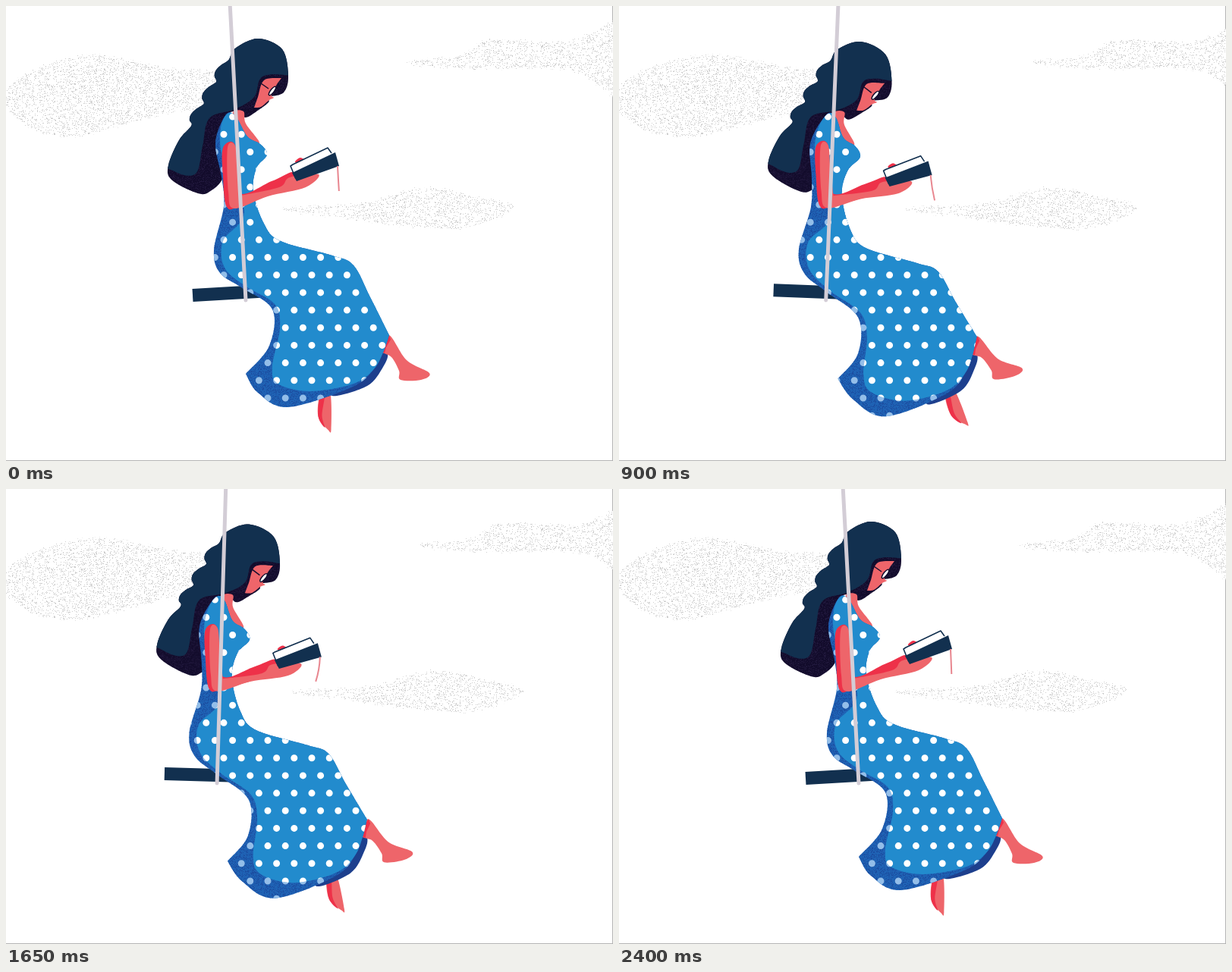
Recreate the animation shown at these times as an HTML page with a canvas. Size 800x600 px, loop 2.43 s.

```html
<!DOCTYPE html>
<html lang="en">
<head>
<meta charset="utf-8">
<title>Reading on a swing</title>
<style>
html, body { margin: 0; width: 100%; height: 100%; overflow: hidden; background: #fff; }
canvas { display: block; }
</style>
</head>
<body>
<canvas id="stage" width="800" height="600"></canvas>
<script>
const ctx = document.getElementById('stage').getContext('2d');
const LOOP = 2430, STEP = 30, HALF = LOOP / 2;
const NAVY = '#12304f', INK = '#130c2c', SKIN = '#ee656a', RED = '#ee3149';
const BLUE = '#228bcd', SHADE = '#1f62b4', DEEP = '#1d3f8d';

let seed = 7;
function random() {
  seed = (seed * 1664525 + 1013904223) % 4294967296;
  return seed / 4294967296;
}

function grain(color, density) {
  const tile = document.createElement('canvas');
  tile.width = tile.height = 256;
  const g = tile.getContext('2d');
  g.fillStyle = color;
  for (let y = 0; y < 256; y++)
    for (let x = 0; x < 256; x++)
      if (random() < density) g.fillRect(x, y, 1, 1);
  return ctx.createPattern(tile, 'repeat');
}
const cloudGrain = grain('#cecece', 0.13);
const edgeGrain = grain('#cecece', 0.05);
const dressGrain = grain('rgba(24,62,146,.55)', 0.3);
const hairGrain = grain('rgba(42,32,72,.6)', 0.25);

const mix = (a, b, p) => a + (b - a) * p;
const points = s => s.split(',').map(pair => pair.trim().split(' ').map(Number));

// Smooth closed curve through key points; a doubled point makes a corner.
function curve(keys, move = q => q) {
  const path = new Path2D(), n = keys.length, moved = keys.map(move);
  const at = i => moved[(i + n) % n];
  path.moveTo(...at(0));
  for (let i = 0; i < n; i++) {
    const [a, b, c, d] = [at(i - 1), at(i), at(i + 1), at(i + 2)];
    if (b[0] === c[0] && b[1] === c[1]) continue;
    path.bezierCurveTo(b[0] + (c[0] - a[0]) / 6, b[1] + (c[1] - a[1]) / 6,
                       c[0] - (d[0] - b[0]) / 6, c[1] - (d[1] - b[1]) / 6, ...c);
  }
  path.closePath();
  return path;
}

function polygon(keys, move = q => q) {
  const path = new Path2D();
  keys.map(move).forEach(q => path.lineTo(...q));
  path.closePath();
  return path;
}

function fill(path, ...styles) {
  for (const style of styles) {
    ctx.fillStyle = style;
    ctx.fill(path);
  }
}

function line(keys, color, width, cap = 'butt') {
  ctx.strokeStyle = color;
  ctx.lineWidth = width;
  ctx.lineCap = cap;
  ctx.lineJoin = 'round';
  ctx.beginPath();
  keys.forEach(q => ctx.lineTo(...q));
  ctx.stroke();
}

function group(draw) {
  ctx.save();
  draw();
  ctx.restore();
}

// Scalloped back edge of the hair, from the nape up to the crown.
const waves = Array.from({ length: 13 }, (_, i) => {
  const y = 158 - i * 7.25;
  return [302 - 0.567 * (y - 56) - 9 * Math.abs(Math.sin(Math.PI * (y - 71) / 29)), y];
});

// All key points describe the right end of the swing.
const clouds = {
  west: points('0 115, 50 79, 120 66, 210 83, 290 90, 290 124, 200 143, 90 171, 25 155'),
  low: points('365 268, 470 261, 550 240, 615 252, 667 266, 610 291, 540 291, 450 279'),
  east: points('528 75, 600 66, 640 45, 740 48, 820 20, 820 125, 745 84, 620 82')
};
const hair = [
  ...points('332 43, 364 57, 372 92, 366 114, 347 120, 346 127, 333 137, 316 147, 305 139, 290 150, 288 220, 268 245, 250 246, 218 229, 214 210, 228 177'),
  ...waves, [302, 56]
];
const hairLight = points('332 30, 390 60, 390 90, 352 90, 335 96, 327 120, 302 136, 268 148, 259 185, 250 221, 222 218, 195 190, 240 90');
const face = points('340 98, 363 95, 363 95, 356 105, 350 118, 353 121, 347 124, 336 133, 327 134, 327 134, 332 120');
const neck = points('299 140, 313 139, 316 155, 334 180, 318 178, 305 160');
const dress = points(`303 146, 318 172, 335 182, 344 196, 330 214, 326 245, 340 287, 362 310, 430 329, 458 342,
  480 384, 505 434, 505 434, 497 457, 484 480, 455 503, 372 529, 332 510, 316 485, 316 485, 347 448,
  351 400, 310 371, 282 352, 274 322, 287 264, 284 225, 276 180, 290 143`);
const dressLight = points(`296 140, 360 170, 360 250, 520 380, 510 440, 484 480, 455 499, 400 508, 358 498,
  351 475, 361 425, 354 393, 315 369, 288 345, 286 310, 314 270, 283 190`);
const hemShadow = points('490 440, 503 457, 497 476, 476 501, 430 514, 440 490');
const frontLeg = points('505 434, 528 467, 558 484, 547 493, 520 493, 518 481, 508 463, 494 454');
const frontLegShade = points('505 434, 507 440, 501 450, 499 458, 490 452');
const backLeg = points('414 512, 427 510, 428 558, 424 559, 411 541');
const backLegShade = points('414 512, 420 512, 416 540, 420 556, 411 541');
const armShade = points('286 187, 302 184, 307 246, 350 231, 378 219, 372 238, 310 263, 291 265, 286 225');
const arm = points('292 187, 302 184, 305 215, 309 250, 309 250, 360 239, 374 226, 412 222, 395 239, 345 251, 301 267, 293 245');
const thumb = points('381 206, 388 200, 396 206');
const pages = points('375 211, 424 187, 432 195, 380 221');
const bookEdge = points('382 228, 375 211, 378 209, 424 187, 429 194');
const cover = points('377 220, 434 193, 439 211, 383 231');

// Cubic ease (.6, 0, .4, 1), solved by bisection.
function ease(x) {
  let lo = 0, hi = 1;
  for (let i = 0; i < 24; i++) {
    const u = (lo + hi) / 2, v = 1 - u;
    if (1.8 * u * v * v + 1.2 * u * u * v + u * u * u < x) lo = u; else hi = u;
  }
  return lo * lo * (3 - 2 * lo);
}

// 0 at the right end of the swing, 1 at the left end.
function swing(time) {
  const t = time % LOOP;
  return ease((t < HALF ? t : LOOP - t) / HALF);
}

// The cloth moves left, most at the hips, and its middle sinks.
const sag = p => ([x, y]) => [
  x + p * (20 * ((y - 345) / 190) ** 2 - 41),
  y + p * 14 * Math.sin(Math.PI * (x - 275) / 240) * Math.min(1, y / 350) ** 2
];

function cloud(keys, dx, stretch = 0) {
  const path = curve(keys, ([x, y]) => [x + dx + stretch * x, y]);
  fill(path, '#fff', cloudGrain);
  ctx.strokeStyle = edgeGrain;
  ctx.lineWidth = 5;
  ctx.stroke(path);
}

// The dots stay in place while the dress moves over them.
function polkaDots(color) {
  ctx.fillStyle = color;
  ctx.beginPath();
  for (let row = 0; row < 18; row++)
    for (let col = 8; col < 24; col++) {
      const x = 8.6 + (col + (row % 2 ? 0 : 0.5)) * 23.2, y = 146.1 + row * 23.18;
      ctx.moveTo(x + 4.5, y);
      ctx.arc(x, y, 4.5, 0, 7);
    }
  ctx.fill();
}

function drawSwingSeat(ropeEnd, p) {
  group(() => {
    ctx.translate(ropeEnd, 388);
    ctx.rotate(mix(-0.058, 0.05, p));
    ctx.fillStyle = NAVY;
    ctx.fillRect(-69.5, -19, 103, 17);
  });
}

function drawHead(p) {
  group(() => {
    ctx.transform(1 + 0.03 * p, 0.097 * p, 0, 1, -24.9 * p, -27.7 * p);
    const outline = curve(hair);
    fill(outline, INK, hairGrain);
    group(() => {
      ctx.clip(outline);
      fill(curve(hairLight), NAVY);
    });
    fill(curve(face), SKIN);
    line([[336, 102], [346, 109]], INK, 1.5);
    ctx.beginPath();
    ctx.ellipse(351, 112, 7, 2.3, -0.9, 0, 7);
    ctx.fillStyle = '#fff';
    ctx.fill();
    ctx.stroke();
  });
}

function drawLegs(p, time) {
  group(() => {
    const kick = swing(time + 150);
    ctx.translate(420 + 16 * kick, 513 - 3 * kick);
    ctx.rotate(-0.38 * kick);
    ctx.translate(-420, -513);
    fill(curve(backLeg), SKIN);
    fill(curve(backLegShade), RED);
  });
  const lag = sag(p ** 1.3);
  fill(curve(hemShadow, sag(p)), DEEP);
  fill(curve(frontLeg, lag), SKIN);
  fill(polygon(frontLegShade, lag), RED);
}

function drawDress(p) {
  const move = sag(p), outline = curve(dress, move);
  fill(curve(neck, move), SKIN);
  fill(outline, SHADE, dressGrain);
  group(() => {
    ctx.clip(outline);
    polkaDots('#93bee9');
    const light = curve(dressLight, move);
    fill(light, BLUE);
    ctx.clip(light);
    polkaDots('#fff');
  });
}

function drawArm(p, time) {
  group(() => {
    ctx.transform(1, 0.1 * p, 0, 1, -29 * p, -30.7 * p);
    fill(curve(armShade), RED);
    fill(curve(thumb), RED);
    fill(curve(arm), SKIN);
    fill(polygon(pages), '#fff');
    line(bookEdge, NAVY, 1.6);
    fill(polygon(cover), NAVY);
    const sway = 1 + 7 * Math.cos((time - 560) / LOOP * 2 * Math.PI);
    ctx.beginPath();
    ctx.moveTo(437, 211);
    ctx.quadraticCurveTo(437.5 + sway * 0.2, 228, 437 + sway, 244);
    ctx.strokeStyle = '#e8868f';
    ctx.lineWidth = 2;
    ctx.stroke();
  });
}

function draw(time) {
  const p = swing(time), ropeEnd = mix(316, 268.5, p);
  ctx.fillStyle = '#fff';
  ctx.fillRect(0, 0, 800, 600);
  ctx.fillStyle = '#b4b4b4';
  ctx.fillRect(799, 0, 1, 600);
  ctx.fillRect(0, 599, 800, 1);

  cloud(clouds.west, -9 * p, 0.15 * p);
  cloud(clouds.low, 16 * p);
  cloud(clouds.east, 20 * p);

  drawSwingSeat(ropeEnd, p);
  drawHead(p);
  drawLegs(p, time);
  drawDress(p);
  drawArm(p, time);
  line([[mix(295, 288.5, p), -5], [ropeEnd, 388]], '#d3cdd6', 5, 'round');
}

function frame(now) {
  draw(Math.floor(now % LOOP / STEP) * STEP);
  requestAnimationFrame(frame);
}
draw(0);
requestAnimationFrame(frame);
</script>
</body>
</html>
```
